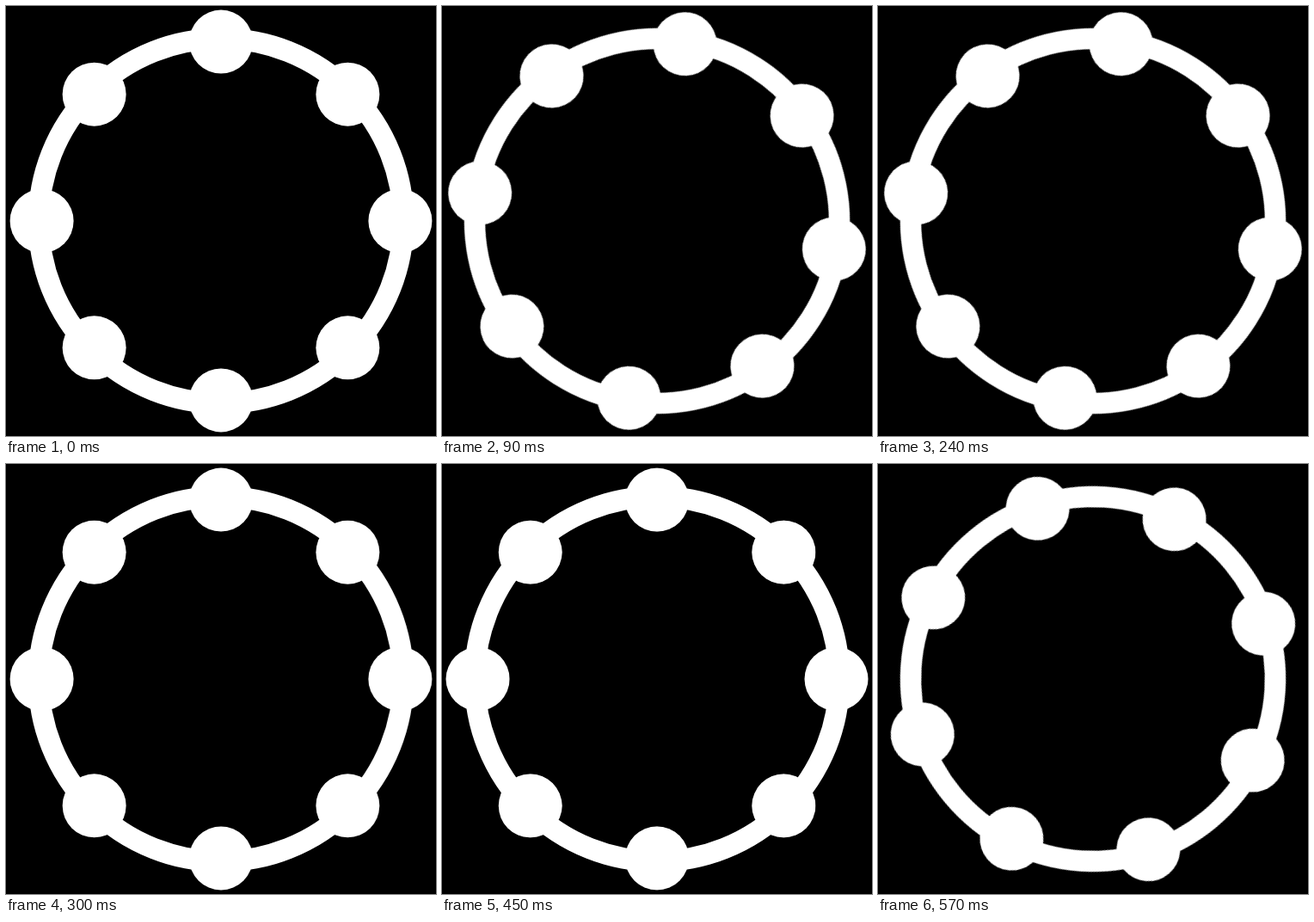
An HTML page for the animation above (0.6 s loop, 500 by 500 pixels).

```html
<!DOCTYPE html>
<html lang="en">
<head>
<meta charset="utf-8">
<title>Beaded ring</title>
<style>
  html, body { margin: 0; width: 100%; height: 100%; overflow: hidden; background: #000; }
  svg { display: block; width: 100%; height: 100%; }
</style>
</head>
<body>
<svg viewBox="-250 -250 500 500">
  <g id="wheel" fill="#fff">
    <circle r="212" fill="none" stroke="#fff" stroke-width="24.5"/>
  </g>
</svg>
<script>
  const BEADS = 8, ORBIT = 208.4, BEAD_RADIUS = 37;
  const STEPS = 20, LOOP_MS = 600;
  const wheel = document.getElementById('wheel');

  for (let i = 0; i < BEADS; i++) {
    const angle = i * 2 * Math.PI / BEADS;
    const bead = document.createElementNS(wheel.namespaceURI, 'circle');
    bead.setAttribute('cx', ORBIT * Math.cos(angle));
    bead.setAttribute('cy', ORBIT * Math.sin(angle));
    bead.setAttribute('r', BEAD_RADIUS);
    wheel.append(bead);
  }

  // One clockwise turn per loop, held in equal steps.
  wheel.animate(
    { transform: ['rotate(0deg)', 'rotate(360deg)'] },
    { duration: LOOP_MS, iterations: Infinity, easing: `steps(${STEPS}, end)` }
  );
</script>
</body>
</html>
```
